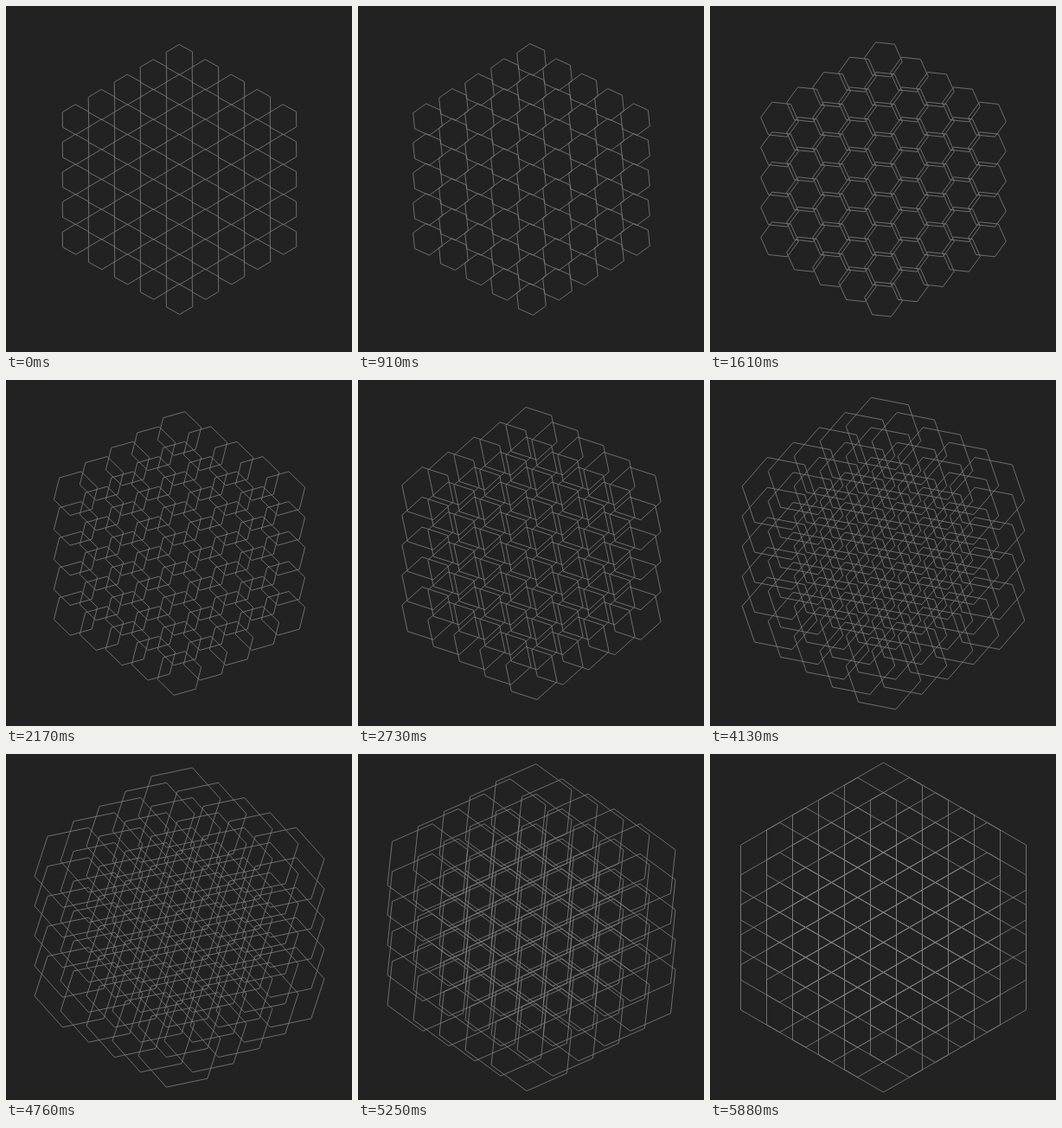
Write an HTML page with a canvas that moves like this. It is 400x400 px and loops after 5.95 s.

```html
<!DOCTYPE html>
<html lang="en">
<head>
<meta charset="utf-8">
<title>Turning hexagons</title>
<style>
  html, body { margin: 0; width: 100%; height: 100%; overflow: hidden; background: #222; }
  canvas { display: block; width: 400px; height: 400px; }
</style>
</head>
<body>
<canvas id="stage" width="400" height="400"></canvas>
<script>
const ctx = document.getElementById('stage').getContext('2d');
const LOOP = 5950, STEP = 70;
const SWING = 80.8, LEAD = 3.8; // steps from smallest to largest, and before the smallest
const CX = 200.5, CY = 200.5;
const RINGS = 4, COL = 30, ROW = 20 * Math.sqrt(3);
const R_MIN = ROW / 2, R_MAX = R_MIN * 3;

// Hexagonal lattice: 5 to 9 cells per column
const centres = [];
for (let q = -RINGS; q <= RINGS; q++) {
  const count = 2 * RINGS + 1 - Math.abs(q);
  for (let k = 0; k < count; k++) {
    centres.push([CX + q * COL, CY + (k - (count - 1) / 2) * ROW]);
  }
}

function hexagon(x, y, r, angle) {
  for (let k = 0; k < 6; k++) {
    const a = angle + k * Math.PI / 3;
    ctx.lineTo(x + r * Math.cos(a), y + r * Math.sin(a));
  }
  ctx.closePath();
}

function draw(step) {
  const e = (1 - Math.cos(Math.PI * (step - LEAD) / SWING)) / 2;
  const r = R_MIN + (R_MAX - R_MIN) * e;
  const angle = -Math.PI / 2 - Math.PI * e;

  ctx.fillStyle = '#222';
  ctx.fillRect(0, 0, 400, 400);
  ctx.strokeStyle = '#808080';
  ctx.lineWidth = 0.8;
  for (const [x, y] of centres) {
    ctx.beginPath();
    hexagon(x, y, r, angle);
    ctx.stroke();
  }
}

const start = performance.now();
function tick() {
  const t = Math.max(0, performance.now() - start) % LOOP;
  draw(Math.floor(t / STEP));
  requestAnimationFrame(tick);
}
tick();
</script>
</body>
</html>
```
